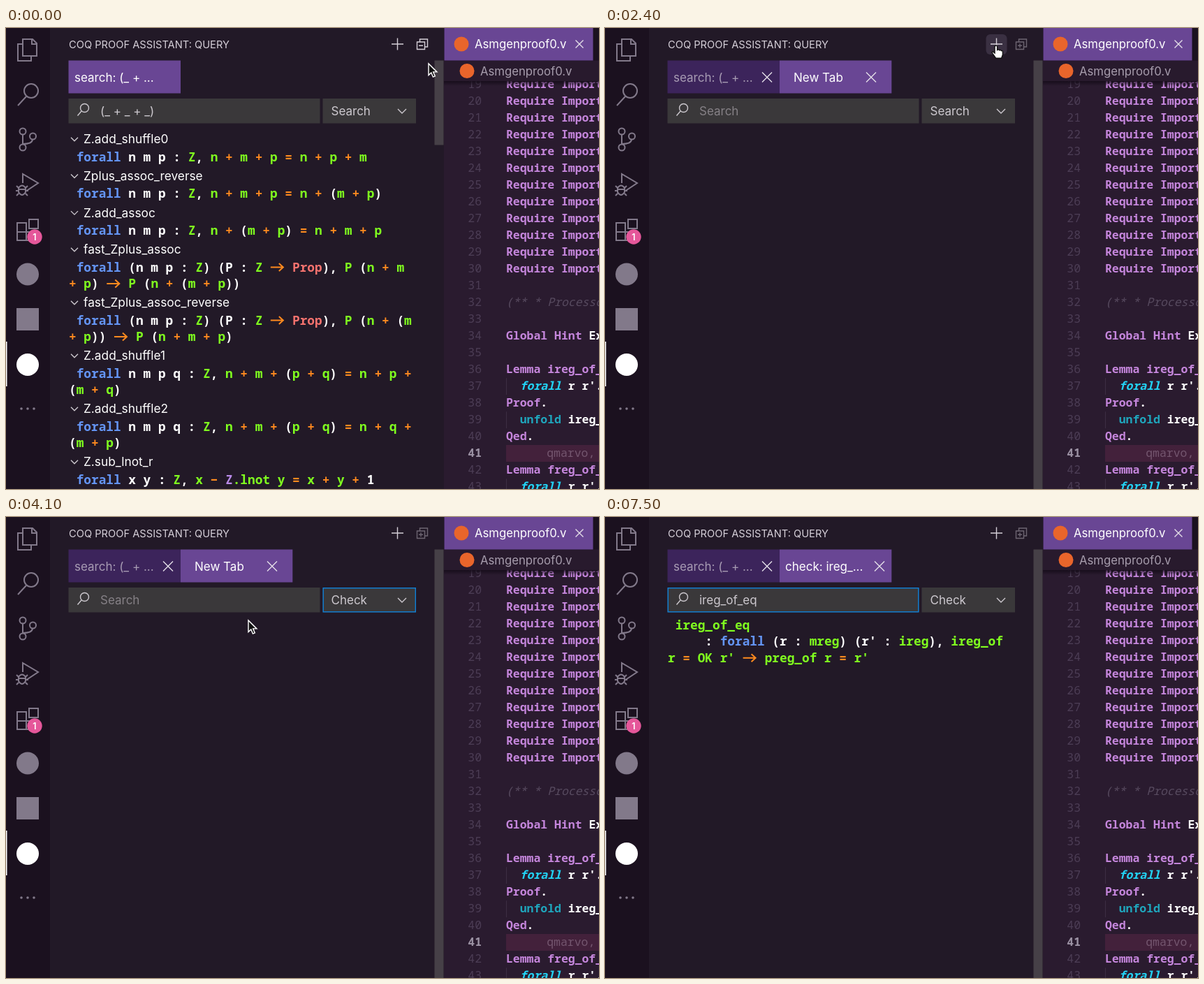
These frames come from a looping animation (849 px wide and 660 px high, 7700 ms). An HTML page:

```html
<!DOCTYPE html>
<html lang="en">
<head>
<meta charset="utf-8">
<title>Coq query panel</title>
<style>
  html, body { margin: 0; width: 100%; height: 100%; overflow: hidden; background: #221927; }
  svg { display: block; width: 100vw; height: 100vh; stroke-width: 1.4; }
  text { font: 17px Inter, "Open Sans", sans-serif; fill: #fff; white-space: pre; }
  .list { font-size: 17.3px; }
  .code { font: 600 17.77px "Noto Sans Mono", "DejaVu Sans Mono", monospace; }
  .editor { font: 600 16.45px "Noto Sans Mono", "DejaVu Sans Mono", monospace; }
</style>
</head>
<body>
<svg id="stage" viewBox="0 0 849 660" preserveAspectRatio="none"></svg>
<script>
const LOOP = 7700, STEP = 100;
const C = {
  white: '#fff', green: '#80ff1f', blue: '#6495f5', orange: '#ff8a1f', salmon: '#f5726e',
  purple: '#b98ae8', keyword: '#c586dc', cyan: '#22d3f5', teal: '#1fa6bd', icon: '#82798a',
  tab: '#694694', field: '#3a383a', focus: '#0e80d8', light: '#ccc8ce'
};

const rect = (x, y, w, h, fill, extra = '') =>
  `<rect x="${x}" y="${y}" width="${w}" height="${h}" fill="${fill}" ${extra}/>`;
const circle = (x, y, r, fill, extra = '') =>
  `<circle cx="${x}" cy="${y}" r="${r}" fill="${fill}" ${extra}/>`;
const path = (d, color, extra = '') => `<path d="${d}" fill="none" stroke="${color}" ${extra}/>`;
const text = (x, y, content, extra = '') => `<text x="${x}" y="${y}" ${extra}>${content}</text>`;
const group = (id, content) => `<g id="${id}">${content}</g>`;
const cross = (x, y, r = 7) =>
  path(`M${x - r} ${y - r}l${2 * r} ${2 * r}m0 ${-2 * r}l${-2 * r} ${2 * r}`, '#e4dfe8');
const chevronDown = (x, y, r = 5) => path(`M${x - r} ${y - r / 2}l${r} ${r} ${r} ${-r}`, C.light);

// Proof terms: one row of coloured tokens; "->" is drawn as a two-column arrow.
const CHAR = 10.66, ROW = 23.33, HEADER = 29.33;
const TOKEN = /forall|Prop|(?! *forall)[\w' ]+(?= :)|->|Z(?=\.)|\.?[A-Za-z_][\w']*|[+=−]|[^]/g;

function tokenColor(token, rest) {
  if (token === 'forall') return C.blue;
  if (token === 'Prop') return C.salmon;
  if (/^[+=−]$/.test(token)) return C.orange;
  if (rest.startsWith(' :')) return C.white;
  if (token === 'Z' && rest[0] === '.') return C.purple;
  return /[A-Za-z]/.test(token) ? C.green : C.white;
}

function codeRow(source, y) {
  let arrows = '';
  const spans = source.replace(TOKEN, (token, at) => {
    if (token === '->') {
      arrows += path(`M${90 + CHAR * at + 1} ${y - 6}h18m-6 -5.5l6 5.5 -6 5.5`, C.orange, 'stroke-width="2"');
      return '  ';
    }
    return `<tspan fill="${tokenColor(token, source.slice(at + token.length))}">${token}</tspan>`;
  });
  return text(90, y, spans, 'class="code"') + arrows;
}

const lemmas = [
  ['Z.add_shuffle0', ' forall n m p : Z, n + m + p = n + p + m'],
  ['Zplus_assoc_reverse', ' forall n m p : Z, n + m + p = n + (m + p)'],
  ['Z.add_assoc', ' forall n m p : Z, n + (m + p) = n + m + p'],
  ['fast_Zplus_assoc', ' forall (n m p : Z) (P : Z -> Prop), P (n + m', '+ p) -> P (n + (m + p))'],
  ['fast_Zplus_assoc_reverse', ' forall (n m p : Z) (P : Z -> Prop), P (n + (m', '+ p)) -> P (n + m + p)'],
  ['Z.add_shuffle1', ' forall n m p q : Z, n + m + (p + q) = n + p +', '(m + q)'],
  ['Z.add_shuffle2', ' forall n m p q : Z, n + m + (p + q) = n + q +', '(m + p)'],
  ['Z.sub_lnot_r', ' forall x y : Z, x − Z.lnot y = x + y + 1'],
  ...['Z.succ_add_lnot_r', 'Zgt_left', 'Zlt_left', 'OMEGA13', 'Z.add3_bit0', 'OMEGA14', 'fast_OMEGA14',
    'Z.log2_mul_above', 'fast_OMEGA13', 'Digits.Zdigits_mult_strong'].map(name => [name])
];

function expandedList() {
  let y = 165.3;
  return lemmas.slice(0, 8).map(([name, ...rows]) => {
    const item = chevronDown(98, y - 6) + text(111, y, name, 'class="list"') +
      rows.map((row, i) => codeRow(row, y + 25.3 + i * ROW)).join('');
    y += HEADER + ROW * rows.length;
    return item;
  }).join('');
}

const collapsedList = () => lemmas.map(([name], i) => {
  const y = 165.3 + i * HEADER;
  return path(`M96 ${y - 11}l5 5 -5 5`, C.light) + text(111, y, name, 'class="list"');
}).join('');

function activityBar() {
  const icon = d => path(d, C.icon, 'stroke-width="2"');
  const ring = (x, y, r) => circle(x, y, r, 'none', `stroke="${C.icon}" stroke-width="2"`);
  return rect(0, 0, 63, 660, '#1b111f') +
    icon('M24 16h14l6 6v18h-20zM37 16v7h7M24 23h-7v24h19v-7') +
    ring(36, 90, 10) + icon('M29 98l-12 13') +
    ring(24, 148, 4.5) + ring(24, 171, 4.5) + ring(38.5, 155, 4.5) + icon('M24 153v13M38 160q-1 6 -14 6') +
    icon('M24 222v-13l22 13 -18 12M18 229q5 -7 10 0v6q-5 8 -10 0zM18 231h10M15 226l3 3M31 226l-3 3M14 233h4M28 233h4M15 240l3 -3M31 240l-3 -3') +
    icon('M16 279h13v25h-13zM16 292h25v12h-12M33 274h13v13h-13z') +
    circle(41, 299, 10.7, '#e5579a') + text(41, 303.5, '1', 'text-anchor="middle" style="font-size:12.5px;font-weight:600"') +
    circle(31, 352.5, 16, C.icon) +
    rect(15, 401, 32, 32, C.icon) +
    rect(0, 449, 1.5, 64, C.white) + circle(31, 482, 16, C.white) +
    [22, 31, 40].map(x => circle(x, 545, 1.8, C.icon)).join('');
}

function editor() {
  const LINE = 24.03, COL = 9.87, LEFT = 716;
  const baseline = n => 109.6 + (n - 20) * LINE;
  const word = (n, col, content, color, style = '') =>
    text(LEFT + col * COL, baseline(n), content, `class="editor" style="fill:${color};${style}"`);
  let out = rect(627, 0, 222, 660, '#2a1b2f') + rect(LEFT, 597, 133, 24, '#43213b');
  for (const n of [37, 39, 43]) out += rect(LEFT, baseline(n) - 17, 1, 24, '#3d2d43');
  for (let n = 19; n <= 43; n++) {
    const color = n === 41 ? '#9c92a4' : '#4c3d55';
    out += text(681, baseline(n), n, `class="editor" text-anchor="end" style="fill:${color};font-weight:${n === 41 ? 600 : 400}"`);
  }
  for (let n = 19; n <= 30; n++) out += word(n, 0, 'Require Import', C.keyword);
  out += word(32, 0, '(** * Processor', '#574a5f', 'font-style:italic;font-weight:400') +
    word(34, 0, 'Global Hint', C.keyword) + word(34, 12, 'Ext', C.white) +
    word(36, 0, 'Lemma ireg_of_eq', C.keyword) +
    word(38, 0, 'Proof', C.keyword) + word(38, 5, '.', C.white) +
    word(39, 2, 'unfold', C.teal) + word(39, 9, 'ireg_of', C.white) +
    word(40, 0, 'Qed', C.keyword) + word(40, 3, '.', C.white) +
    word(41, 5.9, 'qmarvo,', '#74566f', 'font-weight:400') +
    word(42, 0, 'Lemma freg_of_eq', C.keyword);
  for (const n of [37, 43]) out += word(n, 2, 'forall', C.cyan, 'font-style:italic') + word(n, 9, "r r'.", C.white);
  return out +
    rect(627, 76, 222, 7, 'url(#shade)') + rect(627, 46, 222, 30, '#281a2d') +
    rect(627, 0, 222, 46.5, '#1b111f') + rect(627.5, 0, 213, 46.5, C.tab) +
    circle(652, 23, 10.5, '#e9652b') + text(671, 29, 'Asmgenproof0.v', 'style="font-size:16.7px"') + cross(821, 23, 5.5) +
    circle(660, 61.5, 10.5, '#e9652b') + text(679, 67.5, 'Asmgenproof0.v', 'style="font-size:16.7px;fill:#a79dad"');
}

function panel() {
  const framed = (id, x, y, w, h) => rect(x, y, w, h, 'none', `id="${id}" stroke="${C.focus}"`);
  const options = ['Search', 'Check', 'About', 'Locate', 'Print'];
  return text(90, 29, 'COQ PROOF ASSISTANT: QUERY', 'style="font-size:14.67px;fill:#d5cfd8"') +
    rect(0, 9, 30, 29, '#3a3042', 'rx="6" id="hover"') +
    path('M552 23h17M560.5 14.5v17', '#d5cfd8') +
    group('foldIcon', path('M592.5 20v-4h11v11h-4M588.5 20h11v10.5h-11zM591 25.3h6', '#d5cfd8') +
      path('M594 22.3v6', '#d5cfd8', 'id="foldPlus"')) +
    rect(89.5, 46.5, 160.5, 47, C.tab, 'id="firstTab"') + text(98, 77, 'search: (_ + ...', 'id="firstTitle"') +
    group('secondTab', cross(232, 70.5) + rect(250, 46.5, 160.3, 47, C.tab) +
      text(270, 77, 'New Tab', 'id="secondTitle"') + group('secondClose', cross(0, 70.5))) +
    rect(89.5, 101, 360, 35.5, C.field) + framed('inputFocus', 90.2, 101.7, 358.6, 34.1) +
    circle(112.5, 114.5, 6, 'none', `stroke="${C.light}"`) + path('M108 119l-5.5 6.5', C.light) +
    text(135, 125, '', 'id="query"') + rect(0, 109, 1.2, 20, C.light, 'id="caret"') +
    rect(453.5, 101, 133.5, 35.5, C.field) + framed('selectFocus', 454.2, 101.7, 132.1, 34.1) +
    text(465.5, 125, '', `id="mode" style="fill:${C.light}"`) + chevronDown(567, 119, 6) +
    group('menu', rect(454.2, 137, 132.1, 129.6, C.field, `stroke="${C.focus}"`) +
      rect(455, 0, 131, 24.4, '#9b54e0', 'id="choice"') +
      options.map((name, i) => text(459, 156 + i * 24.5, name, 'style="fill:#e4dfe8"')).join(''));
}

const stage = document.getElementById('stage');
stage.innerHTML =
  `<defs><linearGradient id="shade" x2="0" y2="1"><stop stop-color="#120a16" stop-opacity=".8"/>
   <stop offset="1" stop-color="#120a16" stop-opacity="0"/></linearGradient></defs>` +
  rect(0, 0, 849, 660, '#221927') + activityBar() + panel() +
  group('expanded', expandedList()) + group('collapsed', collapsedList()) +
  group('result', [' ireg_of_eq', "     : forall (r : mreg) (r' : ireg), ireg_of", "r = OK r' -> preg_of r = r'"]
    .map((row, i) => codeRow(row, 161 + i * ROW)).join('')) +
  rect(613.5, 46.5, 13, 0, '#464047', 'id="thumb"') + editor() +
  group('pointer',
    group('arrow', '<path d="M0 0v16.5l3.8 -3.6 2.6 6.2 2.9 -1.2 -2.6 -6h5.2z" fill="#111" stroke="#fff"/>') +
    group('hand', '<path d="M-2 1.5q2 -3 3.6 0v5q2 -1.6 3 .4 2 -1 2.8 .7 2 -.6 2 1.6v4l-1.8 5h-8l-4.6 -6.5q-2 -3 .6 -2.8l2.4 2z" fill="#fff" stroke="#111"/>') +
    group('beam', path('M-3 -9q3 0 3 3v12q0 3 -3 3M3 -9q-3 0 -3 3v12q0 3 3 3', C.white)));

const el = {};
stage.querySelectorAll('[id]').forEach(node => el[node.id] = node);
const show = (id, visible) => { el[id].style.display = visible ? '' : 'none'; };
const set = (id, name, value) => el[id].setAttribute(name, value);

// Pointer stops: time, x, y.
const stops = [
  [0, 605, 51], [900, 596, 28], [1200, 596, 28], [1800, 564, 94], [2300, 560, 25], [2450, 560, 25],
  [2950, 565, 122], [3250, 565, 122], [3650, 488, 172], [3750, 488, 172], [4100, 347, 148], [4500, 262, 119]
];
const typed = 'ireg_of_eq';
const keyTimes = [4900, 5000, 5300, 5400, 5600, 5900, 6200, 6300, 6500, 6700];

function pointerAt(t) {
  const i = stops.findIndex(stop => stop[0] > t);
  if (i < 0) return stops[stops.length - 1].slice(1);
  const [t0, x0, y0] = stops[i - 1], [t1, x1, y1] = stops[i];
  const p = (t - t0) / (t1 - t0), ease = p * p * (3 - 2 * p);
  return [x0 + (x1 - x0) * ease, y0 + (y1 - y0) * ease];
}

function render(t) {
  const folded = t >= 1200, newTab = t >= 2400, open = t >= 3000 && t < 3700;
  const checked = t >= 3700, inputFocus = t >= 4400, done = t >= 6900;
  const query = typed.slice(0, keyTimes.filter(time => time <= t).length);

  show('expanded', !folded);
  show('collapsed', folded && !newTab);
  show('foldPlus', folded);
  set('foldIcon', 'opacity', newTab ? 0.42 : 1);
  set('thumb', 'height', newTab ? 613.5 : folded ? 457 : 121);

  show('secondTab', newTab);
  set('firstTab', 'fill', newTab ? '#3c245b' : C.tab);
  el.firstTitle.style.fill = newTab ? '#a79bb3' : C.white;
  el.secondTitle.textContent = done ? 'check: ireg_...' : 'New Tab';
  set('secondTitle', 'x', done ? 258 : 270);
  set('secondClose', 'transform', `translate(${done ? 393 : 381})`);
  show('result', done);

  el.query.textContent = newTab ? query || 'Search' : '(_ + _ + _)';
  el.query.style.fill = newTab && !query ? '#858086' : C.light;
  el.mode.textContent = checked ? 'Check' : 'Search';
  show('inputFocus', inputFocus);
  show('selectFocus', t >= 3000 && !inputFocus);
  show('caret', inputFocus && t < 7200);
  set('caret', 'x', 135 + (query ? el.query.getComputedTextLength() : 0));

  const [x, y] = pointerAt(t);
  const inside = (x0, y0, x1, y1) => x >= x0 && x <= x1 && y >= y0 && y <= y1;
  const overFold = inside(581, 9, 611, 38) && !newTab, overAdd = inside(546, 9, 575, 38);
  const overInput = inside(90, 101, 449, 136);
  const overButton = overFold || overAdd || inside(454, 101, 587, 136);
  show('hover', overFold || overAdd);
  set('hover', 'x', overFold ? 581 : 545.5);
  show('menu', open);
  set('choice', 'y', 137.7 + (y > 162 ? 24.5 : 0));
  show('pointer', t < 4900);
  set('pointer', 'transform', `translate(${x} ${y})`);
  show('hand', overButton);
  show('beam', overInput);
  show('arrow', !overButton && !overInput);
}

const start = performance.now();
function frame() {
  const elapsed = (performance.now() - start) % LOOP;
  render(Math.floor(elapsed / STEP) * STEP);
  requestAnimationFrame(frame);
}
frame();
</script>
</body>
</html>
```
